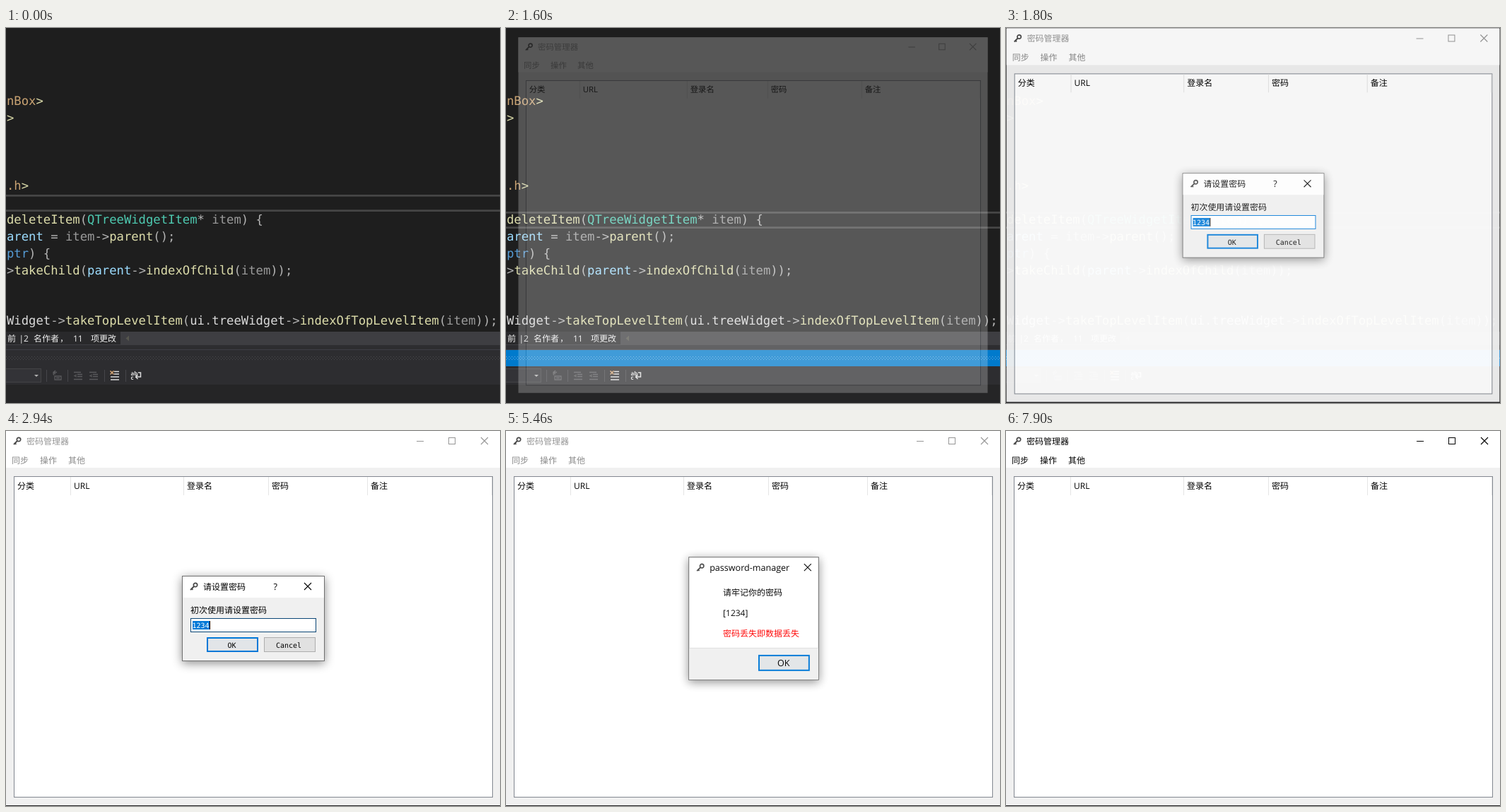
Write an HTML page that moves like this. It is 699x531 px and loops after 8000 ms.

```html
<!DOCTYPE html>
<html lang="zh">
<head>
<meta charset="utf-8">
<title>密码管理器</title>
<style>
html, body { margin: 0; width: 100%; height: 100%; overflow: hidden; background: #1e1e1e; }
svg { display: block; width: 699px; height: 531px; }
text { white-space: pre; font: 12px "Open Sans", "Noto Sans CJK SC", "Noto Sans CJK", sans-serif; text-rendering: geometricPrecision; }
.code { font: 17.23px "DejaVu Sans Mono", monospace; }
.mono { font: 10px "DejaVu Sans Mono", monospace; }
.big { font-size: 12.6px; }
#main { --ink: #969696; --menu: #8a8a8a; }
#main.on { --ink: #000; --menu: #000; }
.ink { fill: var(--ink); }
.menu { fill: var(--menu); }
.btn { stroke: var(--ink); fill: none; }
.shadow { filter: drop-shadow(0 3px 7px rgba(0,0,0,.45)); }
</style>
</head>
<body>
<svg viewBox="0 0 699 531" id="stage">
  <defs>
    <pattern id="dots" width="4" height="4" patternUnits="userSpaceOnUse">
      <path d="M0 1h1v1h-1zM2 3h1v1h-1z" fill="#fff"/>
    </pattern>
  </defs>
  <g id="editor"></g>
  <g id="main"></g>
  <g id="ask"></g>
  <g id="note"></g>
</svg>
<script>
const $ = id => document.getElementById(id);

// ---- markup helpers ----
const rect = (x, y, w, h, fill, extra = '') =>
  `<rect x="${x}" y="${y}" width="${w}" height="${h}" fill="${fill}" ${extra}/>`;
const frame = (x, y, w, h, fill, line, sw = 1) =>
  rect(x + sw / 2, y + sw / 2, w - sw, h - sw, fill, `stroke="${line}" stroke-width="${sw}"`);
const text = (x, y, s, cls = '', fill = '') =>
  `<text x="${x}" y="${y}" class="${cls}" ${fill && `fill="${fill}"`}>${s}</text>`;
const path = (d, line, sw = 1, extra = '') =>
  `<path d="${d}" fill="none" stroke="${line}" stroke-width="${sw}" ${extra}/>`;
const group = (id, body) => `<g id="${id}">${body}</g>`;
const key = (x, y) =>
  `<g transform="translate(${x} ${y})"><circle cx="2" cy="-2" r="2.7" fill="none" stroke="#484848" stroke-width="1.7"/>` +
  path('M0 0L-5 5M-3.2 3.2l1.6 1.6', '#484848', 1.8) + '</g>';
const cross = (x, y, r, line, extra) =>
  path(`M${x - r} ${y - r}l${2 * r} ${2 * r}M${x + r} ${y - r}l${-2 * r} ${2 * r}`, line, 1.1, extra);

// ---- code editor ----
const ink = { f: '#dcdcaa', t: '#4ec9b0', v: '#9cdcfe', a: '#9a9a9a', p: '#b4b4b4', k: '#569cd6', s: '#c8a272', w: '#dadada' };
const lines = [
  [109, 's:nBox|f:>'],
  [133, 'f:>'],
  [229, 's:.h|f:>'],
  [277, 'f:deleteItem|p:(|t:QTreeWidgetItem|p:* |a:item|p:) {'],
  [301, 'v:arent|p: = |a:item|p:->|f:parent|p:();'],
  [325, 'k:ptr|p:) {'],
  [349, 'p:>|f:takeChild|p:(|v:parent|p:->|f:indexOfChild|p:(|a:item|p:));'],
  [420, 'w:Widget|p:->|f:takeTopLevelItem|p:(|w:ui|p:.|w:treeWidget|p:->|f:indexOfTopLevelItem|p:(|a:item|p:));']
];
const esc = s => s.replace(/>/g, '&gt;');
const codeLine = ([y, src]) => text(1, y, src.split('|').map(part =>
  `<tspan fill="${ink[part[0]]}">${esc(part.slice(2))}</tspan>`).join(''), 'code');
const status = [[2, '前'], [18.5, '|'], [25, '2'], [39, '名作者'], [76, '，'], [95, '11'], [120, '项更改']];
const indent = x => path(`M${x} 487.5h10M${x + 5} 490.5h7M${x + 5} 493.5h7M${x} 497.5h12M${x + 4} 491l-3 1.5l3 1.5`, '#5a5a5c', 1.3);

$('editor').innerHTML =
  rect(0, 0, 699, 531, '#1e1e1e') +
  group('row', rect(0, 0, 699, 2.7, '#464646') + rect(0, 21.3, 699, 2.7, '#464646')) +
  lines.map(codeLine).join('') +
  rect(364.5, 262, 1, 19, '#dcdcdc', 'id="caret"') +
  rect(0, 430, 699, 19, '#3e3e42') + rect(0, 430, 162, 18, '#29292b') +
  status.map(([x, s]) => text(x, 443.5, s, '', '#f0f0f0')).join('') +
  '<path d="M174 435.5v8l-4.5-4z" fill="#56564e"/>' +
  rect(0, 449, 699, 56, '#2d2d30') + rect(0, 455, 699, 1, '#3f3f46') +
  rect(0, 456, 699, 23, '#007acc', 'id="bar"') +
  rect(0, 465, 699, 6, 'url(#dots)', 'id="grip"') +
  rect(0, 505, 699, 26, '#252526') +
  frame(-2, 482, 52, 20, '#333337', '#434346') +
  '<path d="M40 491h6l-3 3z" fill="#b0b0b0"/>' +
  [57, 87, 139, 169].map(x => rect(x, 484, 1, 17, '#46464a')).join('') +
  path('M72 487.5h-4q-2 2 0 4M70 485l-3 2.5l3 2.5M69 493h9v5h-9zM71 495.5h5', '#5a5a5c', 1.3) +
  indent(96) + indent(118) +
  path('M153 486.5h7M153 490h7M148 494h12M148 498h12', '#dcdcdc', 1.6) +
  path('M147.5 485.5l5 5M152.5 485.5l-5 5', '#d8a878', 1.5) +
  '<text x="176.5" y="491.5" fill="#dcdcdc" style="font-size:8px;font-weight:700">ab</text>' +
  '<text x="176.5" y="497.5" fill="#dcdcdc" style="font-size:8px;font-weight:700">c</text>' +
  path('M187 488h3.5v6h-7M186.5 491l-3 3l3 3', '#dcdcdc', 1.5);

// ---- main window ----
const menus = [[8, '同步'], [48, '操作'], [88, '其他']];
const heads = [[16, '分类'], [96, 'URL'], [256, '登录名'], [376, '密码'], [516, '备注']];
$('main').innerHTML =
  rect(0, 0, 699, 530, '#f0f0f0') + rect(0, 0, 699, 52, '#fff') +
  key(16, 14) + text(29, 18.5, '密码管理器', 'ink') +
  path('M581 14.5h10', '', 1, 'class="btn"') +
  '<rect x="626.5" y="9.5" width="9" height="9" class="btn"/>' +
  cross(677, 14, 5, '', 'class="btn"') +
  menus.map(([x, s]) => text(x, 46, s, 'menu')).join('') +
  frame(11, 64, 678, 455, '#fff', '#828790') +
  [91, 251, 371, 511, 687].map(x => rect(x, 65, 1, 26, '#e5e5e5')).join('') +
  heads.map(([x, s]) => text(x, 81.8, s)).join('');

// ---- password prompt ----
const hot = (x, y, w, h) => frame(x, y, w, h, '#e5f1fb', '#0078d7');
const plainOk = (x, y, w, h) => frame(x, y, w, h, '#e2e5e8', '#0078d7', 2);
$('ask').innerHTML =
  rect(249, 205, 202, 121, '#707070', 'class="shadow"') +
  rect(250, 206, 200, 119, '#f0f0f0') + rect(250, 206, 200, 30, '#fff') +
  key(266, 220) + text(279, 225, '请设置密码') + text(378.5, 225, '?', 'big') +
  cross(427, 220, 5, '#000') +
  text(261, 258, '初次使用请设置密码') +
  frame(261, 265, 178, 20, '#fff', '#0078d7') +
  group('editHot', frame(261, 265, 178, 20, 'none', '#171717')) +
  group('sel', rect(264, 269, 24, 12, '#0078d7')) +
  '<text id="pass" x="263.5" y="279" class="mono">1234</text>' +
  rect(288, 269, 1, 12, '#000', 'id="blink"') +
  plainOk(284, 292, 73, 21) + group('okHot', hot(284, 292, 73, 21)) +
  text(313.5, 307, 'OK', 'mono') +
  frame(365, 292, 73, 21, '#e1e1e1', '#adadad') + group('cancelHot', hot(365, 292, 73, 21)) +
  text(382, 307, 'Cancel', 'mono');

// ---- reminder box ----
$('note').innerHTML =
  rect(258, 178, 185, 175, '#707070', 'class="shadow"') +
  rect(259, 179, 183, 173, '#fff') + rect(259, 307, 183, 45, '#f0f0f0') + rect(259, 307, 183, 1, '#dfdfdf') +
  key(275, 193) + text(288, 198, 'password-manager', 'big') + cross(427, 193, 5, '#000') +
  text(307, 233, '请牢记你的密码') + text(307, 262, '[1234]') +
  text(307, 291, '密码丢失即数据丢失', '', '#f00') +
  plainOk(357, 317, 73, 23) + group('noteHot', hot(357, 317, 73, 23)) +
  text(384, 333, 'OK', 'big');

// ---- timing: [ms, opacity, scale], each row held until the next ----
const mainSteps = [[0, 0, 1], [1600, .25, .95], [1670, .62, .983], [1740, .86, .994], [1800, .96, .998], [1870, 1, 1]];
const askSteps = [[0, 0, 1], [1670, .22, .953], [1740, .6, .983], [1800, .86, .994], [1870, .96, .998], [1940, 1, 1],
  [5130, .8, .985], [5200, .4, .95], [5260, .12, .92], [5330, 0, .9]];
const noteSteps = [[0, 0, 1], [5260, .22, .95], [5330, .62, .983], [5390, .86, .994], [5460, .96, .998], [5520, 1, 1],
  [7640, .9, .99], [7700, .55, .965], [7770, .25, .94], [7830, .08, .915], [7900, 0, .9]];
const blinkOn = [[1600, 2200], [2670, 3200], [3730, 4460], [4800, 5400]];

const held = (rows, t) => rows.filter(r => r[0] <= t).pop();
const ramp = (t, a, b) => Math.min(1, Math.max(0, (t - a) / (b - a)));
const fade = (id, v) => $(id).setAttribute('opacity', v);

function pose(id, rows, t, cx, cy) {
  const [, alpha, k] = held(rows, t), g = $(id);
  g.style.display = alpha ? '' : 'none';
  g.style.opacity = alpha;
  g.setAttribute('transform', `translate(${cx} ${cy}) scale(${k}) translate(${-cx} ${-cy})`);
}

function draw(t) {
  $('row').setAttribute('transform', `translate(0 ${t < 270 ? 236 : 260})`);
  fade('caret', t >= 270 && t < 870 ? 1 : 0);
  fade('bar', t < 870 ? 0 : 1);
  fade('grip', t < 870 ? .14 : .38);

  pose('main', mainSteps, t, 349.5, 265);
  pose('ask', askSteps, t, 350, 265);
  pose('note', noteSteps, t, 350.5, 265.5);
  $('main').classList.toggle('on', (t >= 5130 && t < 5330) || t >= 7700);

  const picked = t < 4000;
  fade('sel', picked ? 1 : 0);
  $('pass').setAttribute('fill', picked ? '#fff' : '#000');
  fade('blink', blinkOn.some(([a, b]) => t >= a && t < b) ? 1 : 0);
  fade('cancelHot', t < 2340 ? 0 : .5 * (1 - ramp(t, 2540, 2740)));
  fade('editHot', ramp(t, 2740, 3140) - ramp(t, 4660, 4900));
  fade('okHot', ramp(t, 4660, 4900));
  fade('noteHot', ramp(t, 6780, 6980));
}

const start = performance.now();
function tick(now) {
  draw(Math.max(0, now - start) % 8000);
  requestAnimationFrame(tick);
}
draw(0);
requestAnimationFrame(tick);
</script>
</body>
</html>
```
